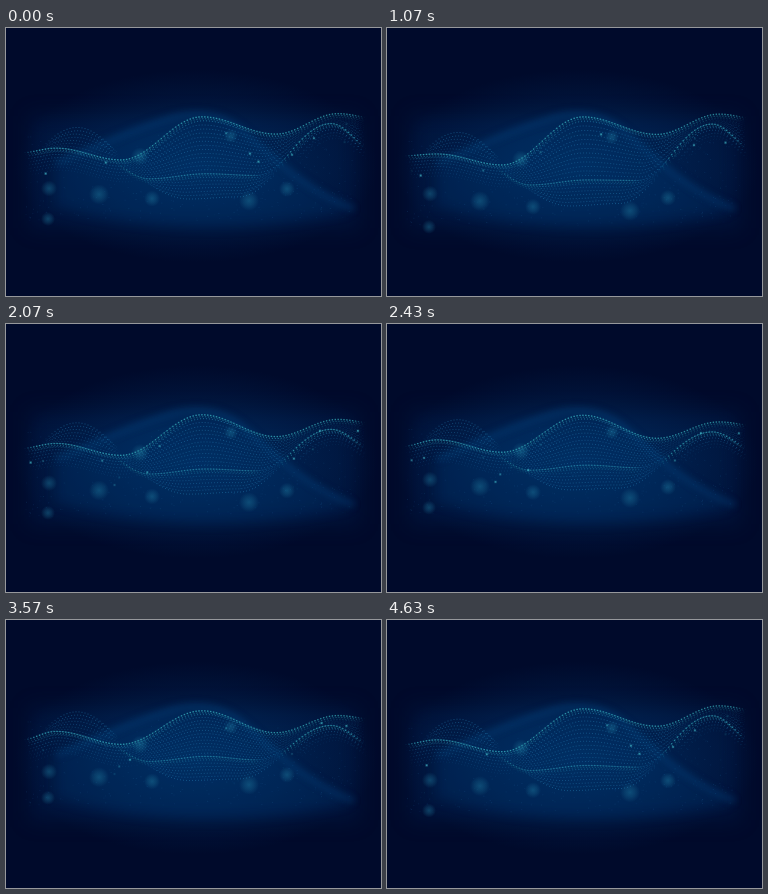
An HTML page with a canvas for the animation above (4660 ms loop, 375 by 268 pixels).

```html
<!DOCTYPE html>
<html lang="en">
<head>
<meta charset="utf-8">
<title>Particle wave</title>
<style>
html, body { margin: 0; width: 100%; height: 100%; overflow: hidden; background: #000a2b; }
canvas { display: block; }
</style>
</head>
<body>
<canvas id="stage" width="375" height="268"></canvas>
<script>
const W = 375, H = 268, LOOP = 4660;
const LEFT = 18, RIGHT = 358;
const ctx = document.getElementById('stage').getContext('2d');

// Turning points of each curve: x, mean y, swing (negative: right-hand phase)
const CREST = [[14, 124, 4], [50, 118.5, 7.5], [115, 130.5, 6.5], [196, 90, -1.5],
  [270, 110, -5], [332, 91.5, -7.5], [372, 96, -7]];
const MIDDLE = [[90, 126, 7], [143, 149, 8], [200, 144, 8], [250, 146, 6.5], [325, 97, -7.5], [375, 112, -5]];
const KEEL = [[80, 124, 7], [180, 169, 9], [230, 167, 8.5], [325, 101.5, -7.5], [372, 126, -2]];

// Soft lights: x, mean y, radius
const GLOWS = [[43, 158.5, 8], [93, 165, 10], [146, 170, 8], [243, 174, 10],
  [281, 162.5, 8], [42, 188, 7], [134, 128, 9], [225, 108, 7]];

let seed = 7;
const rand = () => (seed = (seed * 16807) % 2147483647) / 2147483647;
const between = (a, b) => a + (b - a) * rand();
const many = (n, make) => Array.from({ length: n }, make);

const motes = many(420, () => ({ x: between(20, 354), y: between(104, 192), alpha: between(.05, .18) }));
const sparks = many(24, () => ({ x: between(24, 354), depth: between(.1, .8), peak: between(0, LOOP) }));

const mix = (a, b, s) => a + (b - a) * s;
const wave = (t, peak) => Math.cos((t - peak) / LOOP * 2 * Math.PI);
const sway = (y, swing, t) => y + swing * wave(t, swing < 0 ? 500 : 1000);
const edge = (x, x0, x1, soft) => Math.min(1, (x - x0) / soft, (x1 - x) / soft);

// Cosine easing from one turning point to the next
function curve(keys, t) {
  const pts = keys.map(([x, y, swing]) => [x, sway(y, swing, t)]);
  return x => {
    let i = 0;
    while (i < pts.length - 2 && x > pts[i + 1][0]) i++;
    const [[x0, y0], [x1, y1]] = pts.slice(i, i + 2);
    return mix(y0, y1, (1 - Math.cos(Math.PI * (x - x0) / (x1 - x0))) / 2);
  };
}

function dot(x, y, size, alpha) {
  ctx.globalAlpha = alpha;
  ctx.fillRect(x - size / 2, y - size / 2, size, size);
}

// Net of dots between two curves, fading from alpha a0 to a1; thinner where they close up
function sheet(top, bottom, x0, x1, rows, a0, a1, lean = 1) {
  ctx.fillStyle = '#2f93c8';
  for (let x = x0 + 1; x < x1; x += 3) {
    const y0 = top(x), y1 = bottom(x);
    const fade = edge(x, x0, x1, 10) * Math.min(1, Math.abs(y1 - y0) / rows / 2);
    for (let r = 0; r <= rows; r++) {
      const v = r / rows;
      dot(x + (r % 2) * 1.5 + lean * v, mix(y0, y1, v), 1, fade * mix(a0, a1, v));
    }
  }
}

// Bright line of dots with a short trail below
function ridge(line, x0, x1, alpha) {
  ctx.fillStyle = '#3bb8c0';
  for (let x = x0 + 1; x < x1; x += 2.9) {
    const y = line(x);
    for (let k = 0; k < 3; k++) {
      dot(x + k * .8, y + k * 1.9, 1.35 - k * .15, alpha * edge(x, x0, x1, 14) * .55 ** k);
    }
  }
}

function radial(c, x, y, r, rgb, alpha) {
  const g = c.createRadialGradient(x, y, 0, x, y, r);
  g.addColorStop(0, `rgba(${rgb},${alpha})`);
  g.addColorStop(.5, `rgba(${rgb},${alpha * .55})`);
  g.addColorStop(1, `rgba(${rgb},0)`);
  c.fillStyle = g;
  c.fillRect(x - r, y - r, 2 * r, 2 * r);
}

function paintBackdrop() {
  const layer = document.createElement('canvas');
  layer.width = W;
  layer.height = H;
  const c = layer.getContext('2d');
  c.fillStyle = '#000a2b';
  c.fillRect(0, 0, W, H);
  c.filter = 'blur(10px)';
  c.fillStyle = 'rgba(0,38,88,.36)';
  c.fillRect(24, 88, 328, 112);
  c.filter = 'none';
  c.save();
  c.translate(190, 138);
  c.scale(1, .53);
  radial(c, 0, 0, 182, '3,64,124', .5);
  c.restore();

  const hill = new Path2D('M50 135 C90 120 115 106 150 95 C178 84 206 82 230 98 C262 122 292 160 348 181');
  const body = new Path2D(hill);
  body.quadraticCurveTo(200, 218, 50, 178);
  body.closePath();
  c.filter = 'blur(6px)';
  c.fillStyle = 'rgba(2,72,136,.2)';
  c.fill(body);
  c.filter = 'blur(3px)';
  c.lineWidth = 6;
  c.strokeStyle = 'rgba(10,92,158,.24)';
  c.stroke(hill);
  return layer;
}

const backdrop = paintBackdrop();

function draw(t) {
  const [crest, middle, keel] = [CREST, MIDDLE, KEEL].map(keys => curve(keys, t));
  const dome = x => sway(126 - 28 * Math.sin(Math.PI * (x - 28) / 86), 6.5, t);
  const skirt = x => crest(x) + 22;
  const fringe = x => keel(x) + 15;

  ctx.globalAlpha = 1;
  ctx.drawImage(backdrop, 0, 0);

  for (const [x, y, r] of GLOWS) {
    radial(ctx, x, y + (y - 100) / 8 * wave(t, 900 + x * 1.5), r, '32,128,164', .42);
  }

  ctx.fillStyle = '#2f86c0';
  for (const m of motes) dot(m.x, sway(m.y, 6, t), 1, m.alpha);

  sheet(dome, crest, 30, 114, 7, .42, .25);
  sheet(crest, skirt, LEFT, 128, 7, .55, .1, 3);
  sheet(crest, middle, 108, RIGHT, 14, .42, .32);
  sheet(middle, keel, 108, RIGHT, 7, .32, .38);
  sheet(keel, fringe, 284, RIGHT, 5, .55, .08, 4);

  ridge(crest, LEFT, RIGHT + 1, .68);
  ridge(middle, 108, 256, .42);
  ridge(keel, 272, RIGHT, .66);

  ctx.fillStyle = '#48c4d2';
  for (const { x, depth, peak } of sparks) {
    const light = Math.max(0, wave(t, peak)) ** 2;
    const y = crest(x) + depth * 40;
    dot(x, y, 2.8, light * .18);
    dot(x, y, 1.7, light * .6);
  }
}

function tick() {
  draw(performance.now() % LOOP);
  requestAnimationFrame(tick);
}
tick();
</script>
</body>
</html>
```
